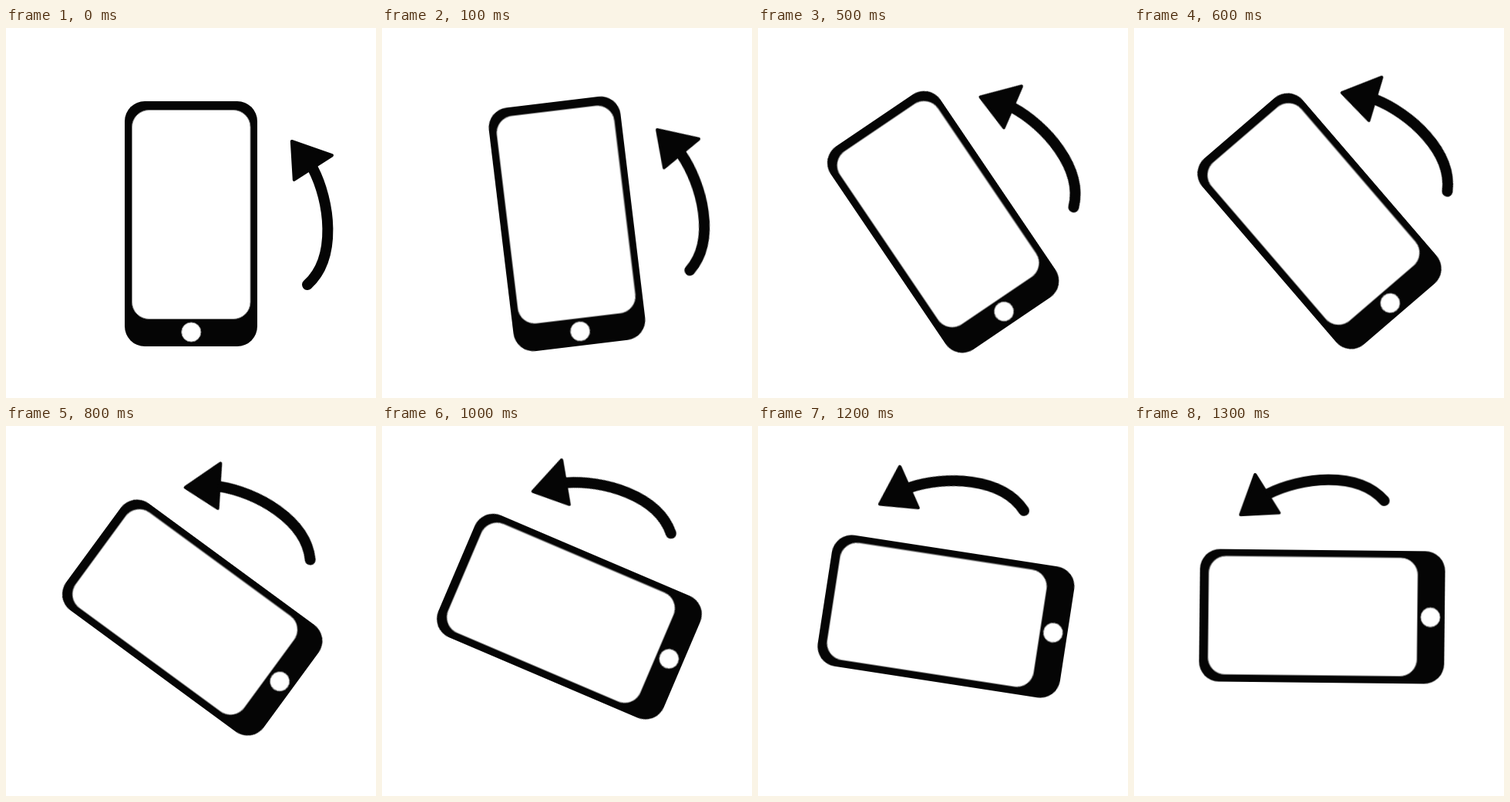
These frames come from a looping animation (480 px wide and 480 px high, 1.4 s). An HTML page:

```html
<!DOCTYPE html>
<html lang="en">
<head>
<meta charset="utf-8">
<title>Turn the phone</title>
<style>
  html, body { margin: 0; width: 100%; height: 100%; overflow: hidden; background: #fff; }
  svg { display: block; width: 100vw; height: 100vh; }
  #rig { transform-origin: 0 0; transform: translate(240px, 254px); }
  .ink { fill: #050505; }
  .line { stroke: #050505; stroke-linecap: round; stroke-linejoin: round; }
  .glass { fill: #fff; stroke: #888; }
</style>
</head>
<body>
<svg viewBox="0 0 480 480">
  <!-- coordinates are relative to the phone's centre -->
  <g id="rig">
    <rect class="ink" x="-86" y="-159" width="172" height="318" rx="26"/>
    <rect class="glass" x="-76.5" y="-147.5" width="153.5" height="271" rx="22"/>
    <circle class="glass" cx="0.3" cy="140.5" r="12.6"/>
    <path class="line" fill="none" stroke-width="14" d="M158 -72C180 -30 190 44 151 79"/>
    <path class="ink line" stroke-width="4" d="M130.8 -107L183 -88.8L133.8 -57.2Z"/>
  </g>
</svg>
<script>
  const STEP = 100, COUNT = 14, LAST = COUNT - 1;

  // smooth 0 to 1 between two steps
  function glide(step, from, to) {
    const k = Math.min(1, Math.max(0, (step - from) / (to - from)));
    return k * k * (3 - 2 * k);
  }

  // near-steady turn that lags a little before the end
  function turnAt(step) {
    const k = step / LAST;
    return 89.4 * k - 23 * k ** 4 * (1 - k);
  }

  function keyframe(i) {
    const step = Math.min(i, LAST);
    const x = 240 + 4 * glide(step, 4, 13);
    const y = 254 - 7 * glide(step, 1, 11);
    return {
      offset: i / COUNT,
      easing: "step-end",
      transform: `translate(${x}px, ${y}px) rotate(${-turnAt(step)}deg)`
    };
  }

  const frames = Array.from({ length: COUNT + 1 }, (_, i) => keyframe(i));
  document.getElementById("rig").animate(frames, {
    duration: STEP * COUNT,
    iterations: Infinity
  });
</script>
</body>
</html>
```
